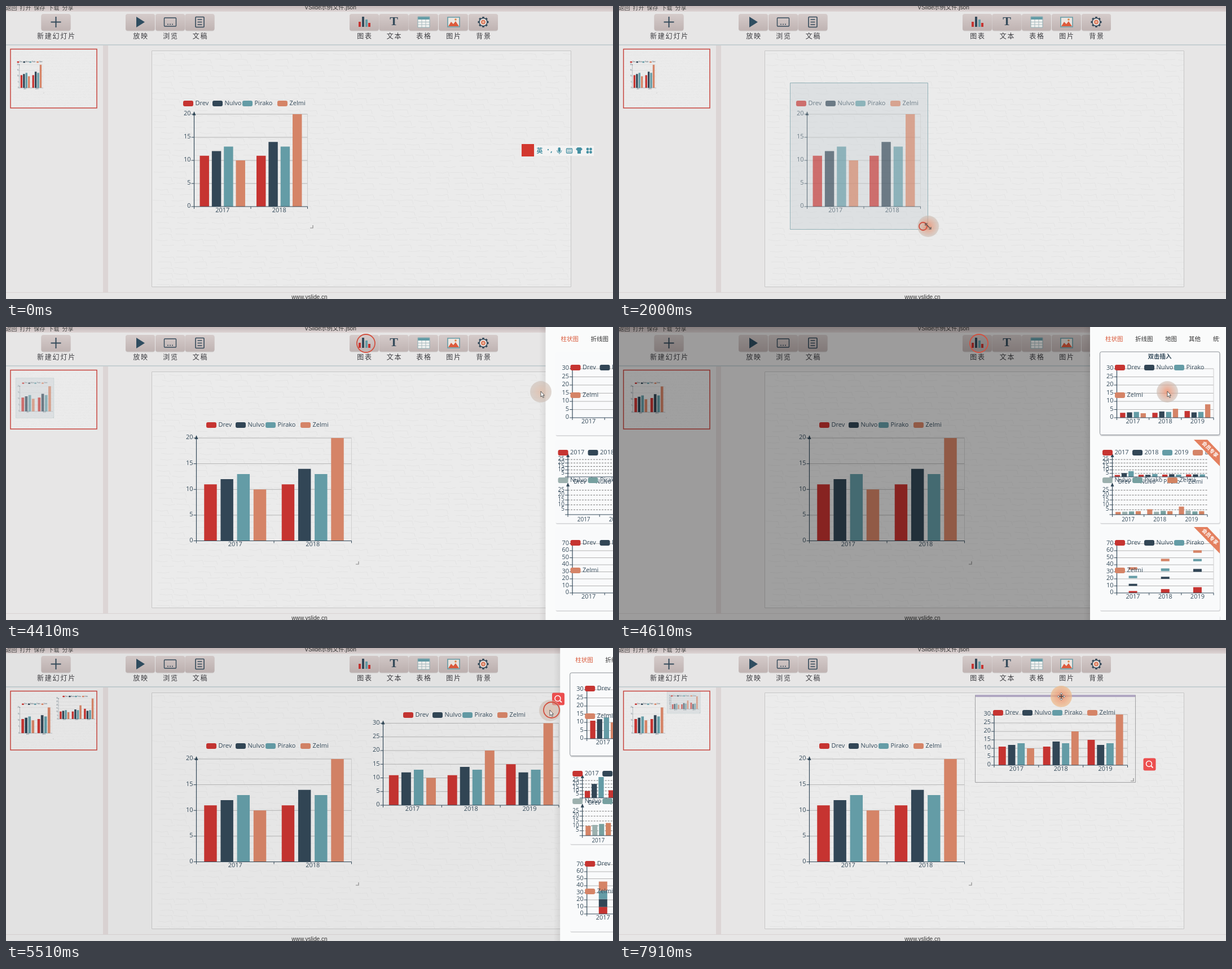
These frames come from a looping animation (1076x520 px, 8000 ms). An HTML page with a canvas:

```html
<!DOCTYPE html>
<html lang="zh">
<head>
<meta charset="utf-8">
<title>Slide editor</title>
<style>
html, body { margin: 0; width: 100%; height: 100%; overflow: hidden; background: #e7e6e6; }
canvas { display: block; width: 1076px; height: 520px; }
</style>
</head>
<body>
<canvas id="stage" width="1076" height="520"></canvas>
<script>
const ctx = document.getElementById('stage').getContext('2d');
const LOOP = 8000, PANEL_X = 835;
const CJK = '"Noto Sans CJK SC", "Noto Sans CJK", sans-serif';
const UI = '"Open Sans", "Noto Sans", ' + CJK;
const ARIAL = '"Liberation Sans", ' + CJK;
const INK = '#344a5a';
const COLORS = ['#c63431', '#324656', '#649ca6', '#d58467', '#9cb0ae', '#76a0a0', '#d28362'];
const NAMES = ['Drev', 'Nulvo', 'Pirako', 'Zelmi'];
const YEARS = ['2017', '2018', '2019'];
const DATA = [[11, 11, 15], [12, 14, 12], [13, 13, 13], [10, 20, 30]];
const ROTATED = [DATA[3], ...DATA.slice(0, 3)];
const GAPS = [0, 52, 105, 167];

const clamp = (v) => Math.min(1, Math.max(0, v));
const between = (t, a, b) => t >= a && t < b;
const ramp = (t, start, length) => clamp((t - start) / length);
const easeOut = (p) => 1 - (1 - p) ** 3;
const easeBoth = (p) => p * p * (3 - 2 * p);

// Each key is [time, ...values]; values glide from key to key.
function glide(keys, t) {
  const i = keys.findIndex((k) => k[0] > t);
  if (i === 0) return keys[0].slice(1);
  if (i < 0) return keys[keys.length - 1].slice(1);
  const [a, b] = [keys[i - 1], keys[i]];
  const p = easeBoth((t - a[0]) / (b[0] - a[0]));
  return a.slice(1).map((v, n) => v + (b[n + 1] - v) * p);
}

// grid left, top, right, bottom, legend x, y, box right, bottom
const CHART_A = [
  [2050, 333.5, 192, 534.5, 356, 314, 173, 548, 397],
  [2450, 337.5, 194, 639, 366, 364, 174, 648, 410],
  [2800, 337.5, 196, 614, 376, 355.5, 174, 625, 424],
  [2950, 337.5, 197, 612.5, 379.5, 355, 174, 629, 424]];
const CHART_B = [
  [6450, 668.5, 133.5, 980, 279, 704, 119, 997, 315],
  [7000, 665, 118, 901.5, 208, 663, 115, 916, 239]];
const POINTER = [
  [100, 1002, -25], [850, 543, 390], [2000, 548, 391], [2450, 636, 412], [2800, 608, 422],
  [2950, 622, 420], [3250, 690, 240], [3650, 638, 29], [4000, 638, 29], [4200, 868, 99],
  [4410, 948, 115], [4610, 972, 115], [5300, 972, 115], [5510, 964, 111], [5700, 964, 115],
  [6250, 992, 310], [6450, 992, 310], [7000, 911, 235], [7150, 911, 235], [7650, 784, 86]];
const RINGS = [[1950, 2100, 539, 391, 7], [3900, 4800, 638, 29, 16],
  [5400, 5600, 967, 110, 14], [6350, 6550, 992, 310, 16]];
const PRESSED = [[1950, 2950], [3850, 4000], [4550, 5050], [6350, 7050], [7700, 8000]];
const SNAPSHOTS = [0, 2700, 4500, 5400, 7000];

function rect(x, y, w, h, fill, radius = 0) {
  ctx.fillStyle = fill;
  ctx.beginPath();
  ctx.roundRect(x, y, w, h, radius);
  ctx.fill();
}
function frame(x, y, w, h, color, width = 1, radius = 0) {
  ctx.strokeStyle = color;
  ctx.lineWidth = width;
  ctx.beginPath();
  ctx.roundRect(x, y, w, h, radius);
  ctx.stroke();
}
function path(points, color, width = 1, fill) {
  ctx.beginPath();
  points.forEach(([x, y]) => ctx.lineTo(x, y));
  if (fill) { ctx.closePath(); ctx.fillStyle = fill; ctx.fill(); }
  if (color) { ctx.strokeStyle = color; ctx.lineWidth = width; ctx.stroke(); }
}
const line = (x1, y1, x2, y2, color, width) => path([[x1, y1], [x2, y2]], color, width);
function disc(x, y, r, fill, stroke, width = 1) {
  ctx.beginPath();
  ctx.arc(x, y, r, 0, 7);
  if (fill) { ctx.fillStyle = fill; ctx.fill(); }
  if (stroke) { ctx.strokeStyle = stroke; ctx.lineWidth = width; ctx.stroke(); }
}
function text(s, x, y, { size = 11, color = INK, align = 'left', font = UI, weight = '', spacing = 0 } = {}) {
  ctx.font = `${weight} ${size}px ${font}`;
  ctx.fillStyle = color;
  ctx.textAlign = align;
  ctx.textBaseline = 'middle';
  ctx.letterSpacing = spacing + 'px';
  ctx.fillText(s, x, y);
}
function verticalGradient(y1, y2, from, to) {
  const g = ctx.createLinearGradient(0, y1, 0, y2);
  g.addColorStop(0, from);
  g.addColorStop(1, to);
  return g;
}

function legend(items, x, y, colors, gaps = GAPS) {
  items.forEach((name, i) => {
    rect(x + gaps[i], y - 5, 18, 10, colors[i], 3);
    text(name, x + gaps[i] + 21.5, y);
  });
}

function plot({ grid: [l, t, r, b], cats, rows, max, step, top = max, colors = COLORS, grow = 1,
                stacked, dashed, arrow = true, size = 11, catY = 7 }) {
  const y = (v) => b - (b - t) * v / max;
  const band = (r - l) / cats.length;
  for (let v = 0; v <= top; v += step) {
    if (v) {
      ctx.setLineDash(dashed ? [3, 2] : []);
      line(l, y(v), r, y(v), dashed ? '#777' : '#b4b4b4');
      ctx.setLineDash([]);
    }
    line(l - 5, y(v), l, y(v), INK);
    if (v || !dashed) text(v, l - 6, y(v) - 0.5, { size, align: 'right' });
  }
  if (!dashed) line(r, t, r, b, '#cfcfcf');
  const width = stacked ? 15 : band * 0.8 / (rows.length + (rows.length - 1) * 0.3);
  cats.forEach((name, c) => {
    let base = 0;
    rows.forEach((row, s) => {
      const x = l + band * c + (stacked ? (band - width) / 2 : band * 0.1 + s * width * 1.3);
      const h = (b - t) * row[c] / max * grow;
      rect(x, y(base) - h, width, h, colors[s]);
      if (stacked) base += row[c];
    });
    text(name, l + band * (c + 0.5), b + catY, { size, align: 'center' });
  });
  line(l, b, r, b, INK, 1.2);
  for (let c = 0; c <= cats.length; c++) line(l + band * c, b, l + band * c, b + 4, INK);
  line(l, t, l, b, INK, 1.2);
  if (arrow) path([[l - 3, t + 2], [l, t - 5], [l + 3, t + 2]], null, 0, INK);
}

// mode: '' idle, 'hover' with a handle bar, 'drag' translucent
function slideChart(left, top, state, mode, years, max, grow) {
  const [l, t, r, b, lx, ly, right, bottom] = state;
  ctx.save();
  if (mode === 'drag') {
    rect(left, top, right - left, bottom - top, 'rgba(200,208,212,.42)');
    frame(left + .5, top + .5, right - left - 1, bottom - top - 1, '#94b2b8');
    ctx.globalAlpha = 0.66;
  } else if (mode === 'hover') {
    frame(left + .5, top + .5, right - left - 1, bottom - top - 1, '#a0a0a2');
    rect(left + 1, top, right - left - 2, 4, '#b0a7c2');
  }
  plot({ grid: [l, t, r, b], cats: YEARS.slice(0, years), rows: DATA, max, step: 5, grow });
  legend(NAMES, lx, ly, COLORS);
  path([[right - 9, bottom - 3], [right - 4, bottom - 3], [right - 4, bottom - 8]], '#8a8a8a', 1.2);
  ctx.restore();
}
function slideCharts(t) {
  const modeA = between(t, 1900, 2950) ? 'drag' : between(t, 800, 1900) ? 'hover' : '';
  slideChart(303, 136, glide(CHART_A, t), modeA, 2, 20, 1);
  if (t < 4850) return;
  const modeB = between(t, 6400, 7050) ? 'drag' : t > 6200 ? 'hover' : '';
  slideChart(631, 83, glide(CHART_B, t), modeB, 3, 30, easeOut(ramp(t, 4850, 500)));
}

// Faint brick wall used as slide background
const wall = document.createElement('canvas');
wall.width = 744;
wall.height = 420;
(function paintWall() {
  const w = wall.getContext('2d');
  let seed = 7;
  const random = () => (seed = seed * 16807 % 2147483647) / 2147483647;
  w.fillStyle = '#ebebeb';
  w.fillRect(0, 0, 744, 420);
  w.strokeStyle = 'rgba(0,0,0,.035)';
  for (let y = 5; y < 420; y += 10) {
    for (let x = random() * 20; x < 744; x += 24 + random() * 14) {
      w.beginPath();
      w.moveTo(x, y + random() * 2);
      w.lineTo(x + 12, y + random() * 3);
      w.lineTo(x + 22, y + random() * 2);
      if (random() > .4) w.lineTo(x + 24, y + 8);
      w.stroke();
    }
  }
})();

const ICONS = [
  ['新建幻灯片', 88.5, (x) => { line(x - 9, 28.5, x + 9, 28.5, INK, 2); line(x, 19, x, 38, INK, 2); }],
  ['放映', 238, (x) => path([[x - 7, 19], [x + 8, 28.5], [x - 7, 38]], null, 0, '#2f4d60')],
  ['浏览', 291, (x) => {
    frame(x - 10.5, 21, 21, 15, INK, 1.4, 1);
    [-4, 0, 4].forEach((d) => disc(x + d, 32.5, 1, INK));
  }],
  ['文稿', 343.5, (x) => {
    frame(x - 7.5, 19.5, 15, 18, INK, 1.6, 1);
    [24, 28.5, 33].forEach((y) => line(x - 4, y, x + 4, y, INK, 1.5));
  }],
  ['图表', 635, (x) => [[-10, 28], [-4, 19], [2, 24], [7, 30]].forEach(([d, y], i) =>
    rect(x + d, y, 4, 37 - y, [COLORS[0], INK, COLORS[2], COLORS[0]][i]))],
  ['文本', 687.5, (x) => text('T', x, 28.5, { size: 22, weight: 'bold', align: 'center', font: '"Liberation Serif", serif' })],
  ['表格', 740, (x) => {
    rect(x - 10, 19, 21, 19, '#f2f2f0');
    rect(x - 10, 19, 21, 5, COLORS[2]);
    [-3, 4].forEach((d) => line(x + d, 24, x + d, 38, '#a9bcc0'));
    [28.5, 33].forEach((y) => line(x - 10, y, x + 11, y, '#a9bcc0'));
    frame(x - 10, 19, 21, 19, '#8fb0b6');
  }],
  ['图片', 793, (x) => {
    rect(x - 10, 20, 21, 17, '#ece5e0');
    path([[x - 9, 36], [x - 4, 28], [x, 32], [x + 4, 27], [x + 10, 36]], null, 0, '#dc5a3c');
    disc(x + 4, 24, 1.8, '#dc8a4c');
    frame(x - 10, 20, 21, 17, COLORS[2], 1.6);
  }],
  ['背景', 846, (x) => {
    for (let i = 0; i < 8; i++) {
      const a = i * Math.PI / 4;
      line(x + 6 * Math.cos(a), 28.5 + 6 * Math.sin(a), x + 9.5 * Math.cos(a), 28.5 + 9.5 * Math.sin(a), INK, 3.5);
    }
    disc(x, 28.5, 7, '#e6dcd8', INK, 1.5);
    disc(x, 28.5, 3, '#e8b49c', '#dc6a48', 1.5);
  }]];

function editor(t) {
  rect(0, 0, 1076, 520, '#e7e6e6');
  rect(0, 0, 1076, 10, verticalGradient(0, 10, '#c5b9b9', '#ddd4d4'));
  ['返回', '打开', '保存', '下载', '分享'].forEach((s, i) =>
    text(s, -0.5 + i * 25, 3, { size: 10, font: CJK, color: '#444' }));
  text('VSlide示例文件.json', 575, 3.5, { size: 10.2, font: ARIAL, align: 'center', color: '#333' });
  for (const [label, x, icon] of ICONS) {
    rect(x - 26, 14.5, 52, 30, 'rgba(120,100,100,.25)', 4);
    rect(x - 26, 14, 52, 29.5, verticalGradient(14, 44, '#d5cbca', '#bfb3b2'), 4);
    icon(x);
    text(label, x + 1, 53, { size: 12, align: 'center', font: CJK, spacing: 1.8, color: '#3c3c40' });
  }
  line(0, 69, 1076, 69, '#a3bac0', 1.2);
  rect(172, 70, 9, 438, '#dcd5d5');
  line(0, 508.5, 1076, 508.5, '#d8d3d3');
  text('www.vslide.cn', 538, 517, { size: 10.1, font: ARIAL, align: 'center', color: '#333' });

  ctx.drawImage(wall, 258, 79);
  frame(258.5, 79.5, 743, 419, '#c6c6c6');
  slideCharts(t);

  ctx.drawImage(wall, 8, 76, 154, 105);
  ctx.save();
  ctx.translate(8, 76);
  ctx.scale(0.207, 0.25);
  ctx.translate(-258, -79);
  slideCharts(SNAPSHOTS.filter((s) => s <= t).pop());
  ctx.restore();
  frame(8, 76.5, 153, 104.5, '#c8453f', 1.5);
}

function inputBar(alpha) {
  if (alpha <= 0) return;
  const ink = '#4590a2';
  ctx.save();
  ctx.globalAlpha = alpha;
  rect(938, 248, 104, 18, '#f3f3f3');
  rect(914, 245, 22, 22, '#d2382f');
  text('英', 946, 257, { size: 11, weight: 'bold', align: 'center', font: CJK, color: ink });
  disc(961, 255, 1.2, ink);
  text(',', 965, 256, { size: 13, weight: 'bold', color: ink });
  rect(978.5, 251, 4.5, 8, ink, 2);
  path([[976.5, 256], [978, 260], [983.5, 260], [985, 256]], ink);
  line(981, 260, 981, 263, ink);
  frame(993.5, 253, 10, 8, ink, 1.3, 1);
  [255.5, 258.5].forEach((y) => line(995, y, 1002, y, ink));
  path([[1010, 254], [1013, 251], [1019, 251], [1022, 254], [1019, 257], [1019, 262], [1013, 262], [1013, 257]], null, 0, ink);
  for (let i = 0; i < 4; i++) disc(1031 + (i % 2) * 5.5, 254 + (i >> 1) * 5.5, 2.4, ink);
  ctx.restore();
}

function ribbon(y) {
  path([[1019, y], [1043, y], [1065, y + 23], [1065, y + 47]], null, 0, '#e4805f');
  ctx.save();
  ctx.translate(1048, y + 17);
  ctx.rotate(Math.PI / 4);
  text('会员专享', 0, 0, { size: 9, weight: 'bold', align: 'center', font: CJK, color: '#fff' });
  ctx.restore();
}
function card(y, draw) {
  ctx.save();
  rect(853, y + 2, 213, 148, '#dadbdd', 3);
  rect(852, y, 213, 148, '#f9fafb', 3);
  ctx.beginPath();
  ctx.rect(852, y, 213, 148);
  ctx.clip();
  draw();
  ctx.restore();
}
function chartPanel(x, t) {
  if (x >= 1075) return;
  const grow = easeOut(ramp(t, 4520, 900));
  const low = COLORS.slice(3);
  ctx.save();
  ctx.translate(x - PANEL_X, 0);
  const shade = ctx.createLinearGradient(PANEL_X - 12, 0, PANEL_X, 0);
  shade.addColorStop(0, 'rgba(0,0,0,0)');
  shade.addColorStop(1, 'rgba(0,0,0,.07)');
  rect(PANEL_X - 12, 0, 12, 520, shade);
  rect(PANEL_X, 0, 260, 520, '#fafbfb');
  ctx.save();
  ctx.beginPath();
  ctx.rect(PANEL_X, 0, 230, 40);
  ctx.clip();
  [['柱状图', 862], ['折线图', 915], ['地图', 968], ['其他', 1010], ['统计', 1053]].forEach(([s, tx], i) =>
    text(s, tx, 21, { size: 10.5, font: CJK, color: i ? '#333' : '#d9593a' }));
  ctx.restore();

  card(44, () => {
    plot({ grid: [882.5, 74, 1054, 161], cats: YEARS, rows: DATA, max: 30, step: 5, grow, arrow: false });
    legend(NAMES.slice(0, 3), 879, 72, COLORS);
    legend(NAMES.slice(3), 879, 121, low);
    if (between(t, 4550, 5450))
      text('双击插入', 958.5, 52, { size: 10.5, weight: 'bold', align: 'center', font: CJK });
  });
  if (t > 4550) frame(852.5, 44, 212.5, 147.5, '#8a9096', 1, 3);
  card(200, () => {
    const byName = YEARS.map((_, i) => ROTATED.map((row) => row[i]));
    plot({ grid: [874.5, 229, 1043, 266], cats: NAMES, rows: byName, max: 30, step: 5, top: 25, grow, dashed: true, size: 10, catY: 9.5 });
    plot({ grid: [874.5, 281, 1043, 333], cats: YEARS, rows: ROTATED, max: 30, step: 5, top: 25, grow, dashed: true, size: 10, catY: 9, colors: low });
    legend([...YEARS, NAMES[0]], 857, 223, COLORS, [0, 53, 106, 160]);
    legend(NAMES.slice(1), 857, 272, low.slice(1), [0, 53, 115]);
    ribbon(200);
  });
  card(355, () => {
    plot({ grid: [882.5, 384.5, 1054, 472], cats: YEARS, rows: ROTATED, max: 70, step: 10, grow, stacked: true, arrow: false });
    legend(NAMES.slice(0, 3), 879, 383, COLORS);
    legend(NAMES.slice(3), 879, 432, low);
    ribbon(355);
  });
  card(511, () => {});
  ctx.restore();
}

function searchButton(x, y) {
  rect(x - 11, y - 11, 22, 22, '#ec4f4f', 3);
  disc(x - 1, y - 1, 5, null, '#fff', 1.5);
  line(x + 3, y + 3, x + 6, y + 6, '#fff', 1.8);
}

function pointer(t) {
  if (t < 100) return;
  const [x, y] = glide(POINTER, t);
  const pressed = PRESSED.some(([a, b]) => between(t, a, b));
  const glow = ctx.createRadialGradient(x, y, 0, x, y, 19);
  glow.addColorStop(0, pressed ? 'rgba(238,130,90,.75)' : 'rgba(222,180,156,.7)');
  glow.addColorStop(1, t > 7200 ? 'rgba(238,188,140,.7)' : 'rgba(200,185,175,.55)');
  disc(x, y, 19, glow);
  for (const [a, b, rx, ry, r] of RINGS)
    if (between(t, a, b)) disc(rx, ry, r, null, '#d2503f', 1.8);
  ctx.save();
  ctx.translate(x, y);
  if (between(t, 800, 2950) || between(t, 6200, 7150)) {
    line(-4, -4, 4, 4, '#555', 1.4);
    path([[-5, -1], [-5, -5], [-1, -5]], '#555', 1.2);
    path([[5, 1], [5, 5], [1, 5]], '#555', 1.2);
  } else if (t > 7550) {
    for (let i = 0; i < 4; i++) {
      ctx.rotate(Math.PI / 2);
      line(0, 0, 5, 0, '#444', 1.4);
      path([[4, -2.5], [7, 0], [4, 2.5]], '#444', .6, '#fff');
    }
  } else {
    path([[0, -1], [0, 9], [2.2, 7], [4, 10.5], [5.5, 9.7], [3.9, 6.4], [6.5, 6.4], [0, -1]], '#444', .9, '#fff');
  }
  ctx.restore();
}

function draw(t) {
  editor(t);
  inputBar(1 - ramp(t, 100, 1800));
  const open = easeOut(ramp(t, 4360, 250)) - easeOut(ramp(t, 5430, 300));
  const dim = 0.32 * (ramp(t, 4420, 180) - ramp(t, 5380, 140));
  if (dim > 0) rect(0, 0, 1076, 520, `rgba(0,0,0,${dim})`);
  chartPanel(1076 - (1076 - PANEL_X) * open, t);
  if (between(t, 5450, 6400)) searchButton(979, 90.5);
  if (t > 7200) searchButton(940.5, 206.5);
  pointer(t);
}

function tick() {
  draw(performance.now() % LOOP);
  requestAnimationFrame(tick);
}
tick();
</script>
</body>
</html>
```
